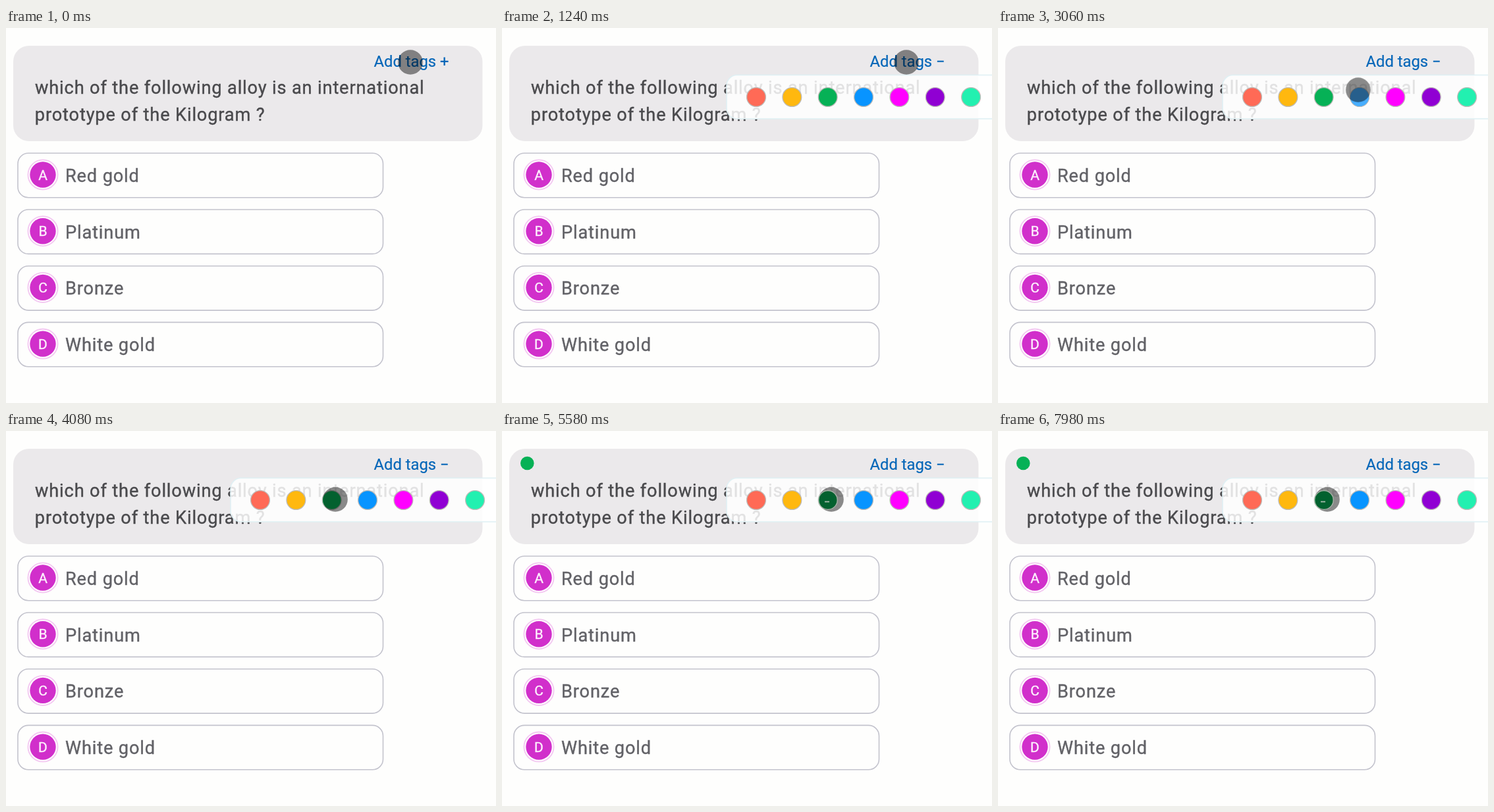
Animation, 744 px wide and 570 px high, one loop 8000 ms. Source, as an HTML page:

```html
<!DOCTYPE html>
<html lang="en">
<head>
<meta charset="utf-8">
<title>Quiz question with colour tags</title>
<style>
  html, body { margin: 0; width: 100%; height: 100%; overflow: hidden; background: #fefefd; }
  svg { display: block; width: 744px; height: 570px; font-family: Roboto, sans-serif; }
  .question, .answer { font-size: 27.2px; letter-spacing: .85px; stroke-width: .4; }
  .question { fill: #4a4a4d; stroke: #4a4a4d; }
  .answer { fill: #626267; stroke: #626267; }
  .box { fill: none; stroke: #c3c3cd; stroke-width: 1.6; }
  .letter { font-size: 21px; fill: #fdf0fd; stroke: #fdf0fd; stroke-width: .4; text-anchor: middle; }
  .link { font-size: 23.8px; fill: #0566b8; stroke: #0566b8; stroke-width: .2; }
  .swatch { stroke: #bdbbb8; stroke-width: 1.3; }

  .anim { animation: 8s linear infinite; }
  .plus { animation-name: plus; }
  .minus { animation-name: minus; }
  .flash { animation-name: flash; }
  .panel { animation-name: panel; }
  .hover { animation-name: hover; }
  .tagged { animation-name: tagged; }
  .pointer { animation-name: move; }
  .disc { animation-name: press; }

  @keyframes plus { 0%, 9.6% { opacity: 1 } 9.61%, 100% { opacity: 0 } }
  @keyframes minus { 0%, 9.6% { opacity: 0 } 9.61%, 100% { opacity: 1 } }
  @keyframes flash { 0%, 8.5% { opacity: 0 } 9.5%, 10.5% { opacity: 1 } 12.5%, 100% { opacity: 0 } }
  @keyframes panel {
    0%, 10.4% { opacity: 0; animation-timing-function: ease-out }
    13.5%, 100% { opacity: 1 }
  }
  @keyframes hover { 0%, 36.5% { opacity: 0 } 38%, 39% { opacity: 1 } 40.5%, 100% { opacity: 0 } }
  @keyframes tagged { 0%, 58.75% { opacity: 0 } 58.76%, 100% { opacity: 1 } }
  @keyframes move {
    0%, 33% { transform: translate(614px, 52px); animation-timing-function: ease-in }
    38.25% { transform: translate(547px, 94px); animation-timing-function: ease-out }
    43.5%, 100% { transform: translate(500px, 104px) }
  }
  @keyframes press {
    0%, 8.5% { fill-opacity: .45 } 9.5%, 10.5% { fill-opacity: .54 }
    12%, 57.5% { fill-opacity: .45 } 58.5%, 59.5% { fill-opacity: .54 }
    61%, 100% { fill-opacity: .45 }
  }
</style>
</head>
<body>
<svg viewBox="0 0 744 570">
  <rect x="11" y="27" width="712.5" height="145" rx="24" fill="#ebe9eb"/>
  <g class="question">
    <text x="44" y="100">which of the following alloy is an international</text>
    <text x="43.8" y="141">prototype of the Kilogram ?</text>
  </g>

  <g id="answers"></g>

  <g class="link">
    <text class="anim plus" x="558.5" y="59.3">Add tags +</text>
    <text class="anim minus" x="558.5" y="59.3">Add tags −</text>
  </g>
  <rect class="anim flash" x="549.5" y="35.5" width="134.5" height="30.5" fill="#33b5e5" fill-opacity=".4"/>

  <g class="anim panel">
    <rect x="341" y="71.5" width="440" height="66.5" rx="16" fill="#fff" fill-opacity=".84" stroke="#def0f4" stroke-width="1.5"/>
    <g id="swatches"></g>
    <circle class="anim hover" cx="549" cy="105" r="14" fill="#48aeff"/>
  </g>

  <circle class="anim tagged" cx="38.3" cy="49" r="10.3" fill="#06b156"/>

  <g class="anim pointer">
    <circle class="anim disc" r="18.8"/>
  </g>
  <g class="anim tagged" fill="none" stroke="#a9bcac">
    <circle cx="495" cy="105" r="14.3" stroke-width="1.2"/>
    <path d="M490 107.5h7" stroke-width="1.8"/>
  </g>
</svg>
<script>
  const fill = (id, items, draw) =>
    document.getElementById(id).innerHTML = items.map(draw).join('');

  fill('answers', ['Red gold', 'Platinum', 'Bronze', 'White gold'], (label, i) => {
    const y = 223.7 + 85.7 * i;
    return `<rect class="box" x="18" y="${y - 33.4}" width="554.5" height="67.4" rx="16"/>
      <circle cx="56" cy="${y - .7}" r="22.6" fill="#fffaff" stroke="#f3c9f1" stroke-width="1.8"/>
      <circle cx="56" cy="${y - .7}" r="19.7" fill="#d12fcb"/>
      <text class="letter" x="56" y="${y + 7}">${'ABCD'[i]}</text>
      <text class="answer" x="90" y="${y + 10.3}">${label}</text>`;
  });

  const colors = ['#ff6a56', '#ffb80f', '#06b156', '#0894ff', '#ff00ff', '#9000d3', '#22f0b0'];
  fill('swatches', colors, (color, i) =>
    `<circle class="swatch" cx="${386 + 54.35 * i}" cy="105" r="14.4" fill="${color}"/>`);
</script>
</body>
</html>
```
